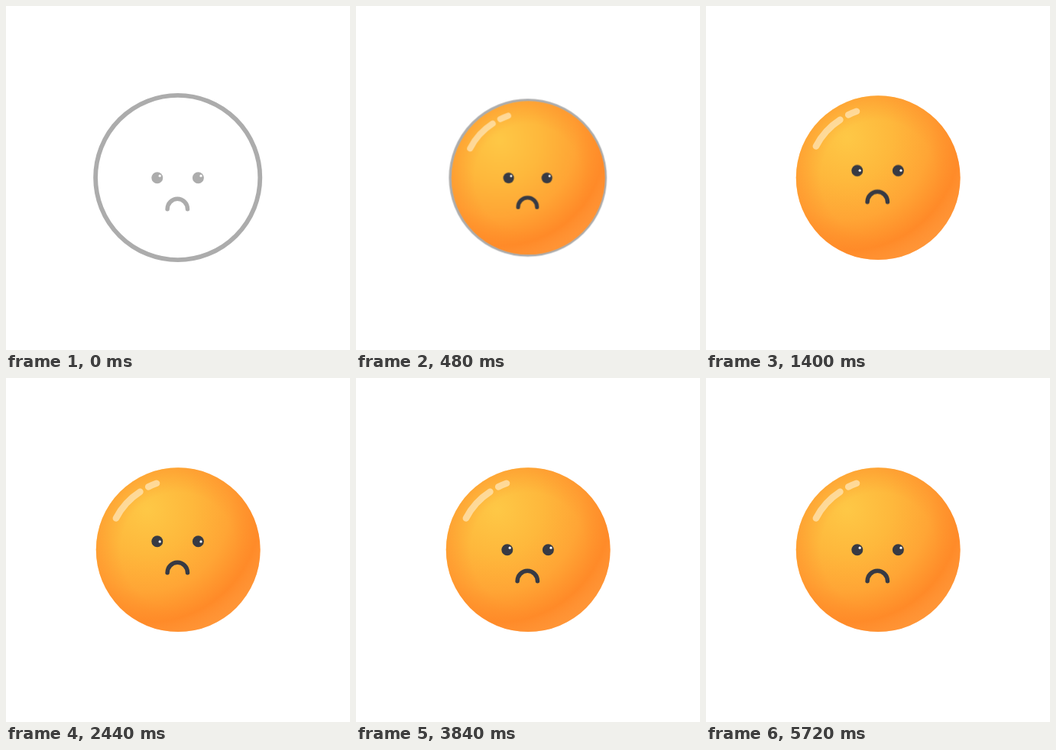
Write an HTML page that moves like this. It is 450 px wide and 450 px high and loops after 6000 ms.

```html
<!DOCTYPE html>
<html lang="en">
<head>
<meta charset="utf-8">
<title>Sad face</title>
<style>
  html, body { margin: 0; width: 100%; height: 100%; overflow: hidden; background: #fff; }
  svg { display: block; width: 100%; height: 100%; }
  #body { transform-box: view-box; transform-origin: 225px 224.7px; }
</style>
</head>
<body>
<svg viewBox="0 0 450 450">
  <defs>
    <radialGradient id="skin" gradientUnits="userSpaceOnUse" cx="185" cy="172" r="178">
      <stop offset="0" stop-color="#fec846"/>
      <stop offset=".33" stop-color="#feb83c"/>
      <stop offset=".6" stop-color="#ffa535"/>
      <stop offset=".83" stop-color="#ff8a28"/>
      <stop offset="1" stop-color="#ffa046"/>
    </radialGradient>
    <radialGradient id="rim" gradientUnits="userSpaceOnUse" cx="225" cy="224.7" r="107.5">
      <stop offset=".7" stop-color="#ff8c2a" stop-opacity="0"/>
      <stop offset="1" stop-color="#ff8c2a" stop-opacity=".45"/>
    </radialGradient>
    <g id="features">
      <circle cx="197.8" cy="224.7" r="7.5"/>
      <circle cx="251.4" cy="224.7" r="7.5"/>
      <path d="M211.1 265.7a13.2 13.4 0 0 1 26.4 0" fill="none" stroke="currentColor" stroke-width="5.5" stroke-linecap="round"/>
    </g>
  </defs>
  <g id="body">
    <circle id="ring" cx="224.7" cy="224.5" r="107.6" fill="none" stroke="#acacac" stroke-width="5.8"/>
    <g id="ball">
      <circle cx="225.2" cy="224.7" r="107.4" fill="url(#skin)"/>
      <circle cx="225.2" cy="224.7" r="107.4" fill="url(#rim)"/>
      <g fill="none" stroke="#fff0d2" stroke-opacity=".62" stroke-width="8.6" stroke-linecap="round">
        <path d="M143.9 183.4A91 91 0 0 1 175.4 148.8"/>
        <path d="M186.2 142.4A91 91 0 0 1 197 137.8"/>
      </g>
    </g>
    <g id="face">
      <use id="pale" href="#features" fill="#acacac" color="#acacac"/>
      <use id="dark" href="#features" fill="#373a44" color="#373a44"/>
    </g>
    <g id="glints" fill="#fff">
      <circle cx="201.2" cy="222.2" r="1.6"/>
      <circle cx="255" cy="222.2" r="1.6"/>
    </g>
  </g>
</svg>
<script>
  const LOOP = 6000;
  const start = document.timeline.currentTime || 0;

  // Each step is [time in ms, value, easing towards the next step].
  function play(id, prop, steps) {
    const last = steps[steps.length - 1];
    const frames = [...steps, [LOOP, last[1]]].map(([time, value, easing = 'linear']) =>
      ({ offset: time / LOOP, [prop]: value, easing }));
    const anim = document.getElementById(id).animate(frames, { duration: LOOP, iterations: Infinity });
    anim.startTime = start;
  }

  const soft = 'cubic-bezier(.42,0,.58,1)';
  const settle = 'cubic-bezier(.4,0,.3,1)';
  const scale = (k, x = 0, y = 0) => `translate(${x}px,${y}px) scale(${k})`;
  const lift = y => `translate(0px,${y}px)`;
  const lookUp = y => [
    [0, lift(0)], [1080, lift(0), settle], [1600, lift(y)],
    [2520, lift(y), soft], [3040, lift(0)]
  ];
  const colourIn = [[0, 0], [200, 0], [440, 1]];

  play('body', 'transform', [
    [0, scale(1), soft], [400, scale(.9), soft],
    [680, scale(1.1, .5, .8), soft], [1280, scale(1)]
  ]);
  play('ring', 'opacity', [[0, 1], [520, 1], [760, 0]]);
  play('ball', 'opacity', colourIn);
  play('dark', 'opacity', colourIn);
  play('pale', 'opacity', [[0, 1], [440, 1], [441, 0]]);
  play('face', 'transform', lookUp(-11));
  // The glints travel less than the eyes, so they slide down inside them.
  play('glints', 'transform', lookUp(-8.2));
</script>
</body>
</html>
```
